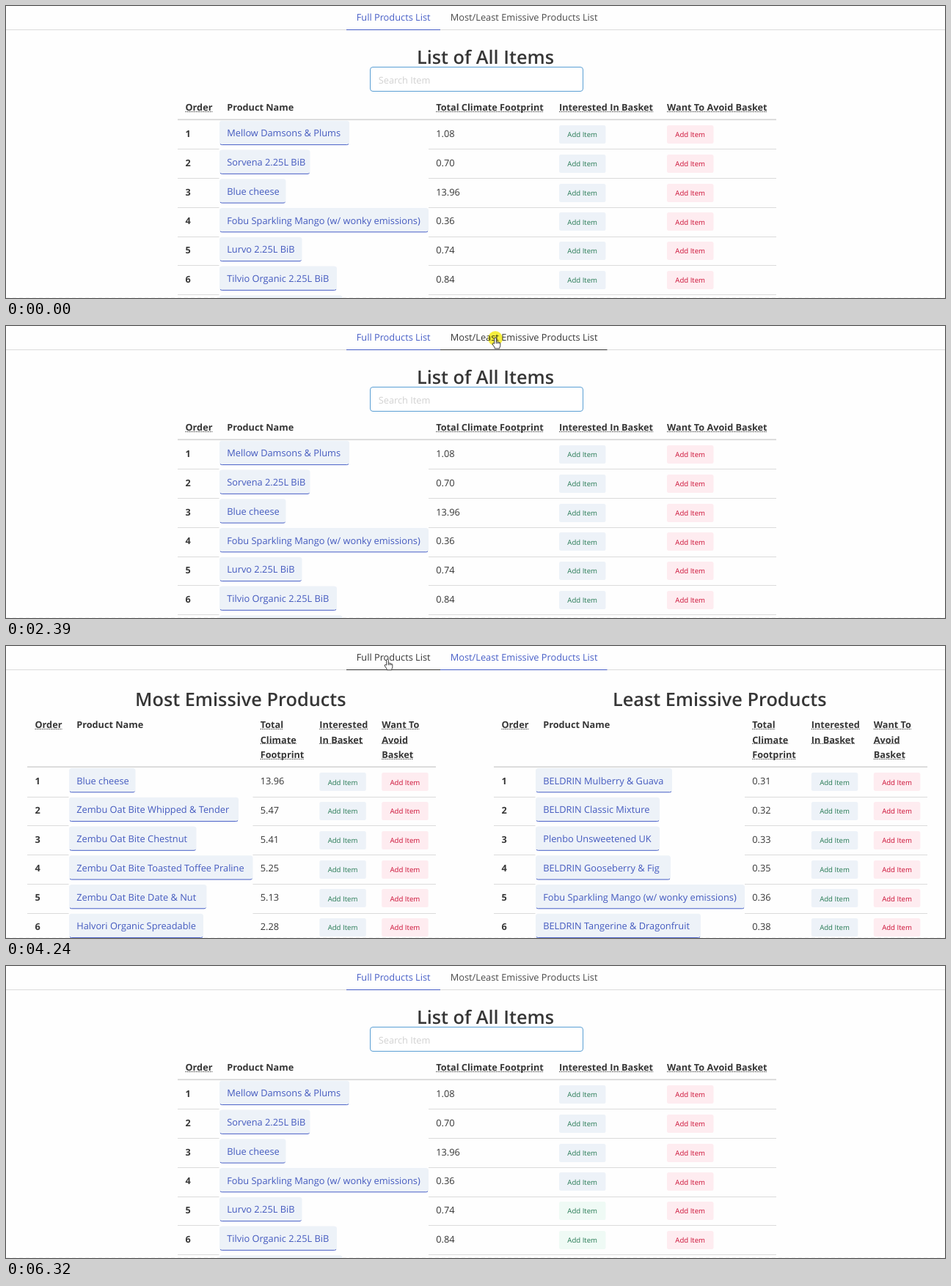
Recreate the animation shown at these times as an HTML page. Size 1280 by 399 pixels, loop 7320 ms.

```html
<!DOCTYPE html>
<html lang="en">
<head>
<meta charset="utf-8">
<title>Product lists</title>
<style>
  html, body { margin: 0; width: 100%; height: 100%; overflow: hidden; background: #fefefe; }
  svg { display: block; width: 100vw; height: 100vh; }
  text { font: 400 12.8px "Open Sans", "Noto Sans", sans-serif; fill: #363636; text-rendering: geometricPrecision; white-space: pre; }
  .bold { font-size: 12.7px; font-weight: 700; }
  .title { font-size: 25.3px; font-weight: 600; text-anchor: middle; }
  .small { font-size: 9.6px; text-anchor: middle; }
  .link { fill: #445abf; }
  .hint { fill: #d2d2d2; }
  .add { fill: #257953; }
  .avoid { fill: #cc0f35; }
</style>
</head>
<body>
<svg id="stage" viewBox="0 0 1280 399"></svg>
<script>
const LOOP = 7320;
const PITCH = 39.75;
const BLUE = '#485fc7', DARK = '#363636', RULE = '#dbdbdb';
const TINT = '#edf2f8', PINK = '#feecf0', MINT = '#effaf5';
const stage = document.getElementById('stage');

function make(parent, tag, attrs) {
  const el = document.createElementNS('http://www.w3.org/2000/svg', tag);
  for (const key in attrs) el.setAttribute(key, attrs[key]);
  parent.appendChild(el);
  return el;
}

function label(parent, x, y, str, cls = '') {
  const el = make(parent, 'text', { x, y, class: cls });
  el.textContent = str;
  return el;
}

function box(parent, x, y, width, height, fill, rx = 0) {
  return make(parent, 'rect', { x, y, width, height, fill, rx });
}

function heading(parent, x, y, str, dotted) {
  const el = label(parent, x, y, str, 'bold');
  if (!dotted) return;
  make(parent, 'path', {
    d: `M${x} ${Math.floor(y) + 1.5}h${el.getComputedTextLength()}`,
    stroke: DARK, 'stroke-dasharray': '1.3 1.1'
  });
}

function chip(parent, x, y, right, str) {
  const top = y + 1.7;
  box(parent, x, top, right - x, 33.4, TINT, 3.5);
  make(parent, 'path', {
    d: `M${x + 1} ${top + 31.9}q1 1 2.5 1H${right - 3.5}q1.5 0 2.5-1`,
    fill: 'none', stroke: BLUE
  });
  label(parent, x + 10.2, y + 23.3, str, 'link');
}

function button(parent, x, y, fill, cls) {
  const rect = box(parent, x, Math.round(y + 8.1), 63.5, 25, fill, 2.5);
  label(parent, x + 31.7, y + 24.3, 'Add Item', 'small ' + cls);
  return rect;
}

// cols: order, name, footprint, interested, avoid, right edge
function table(parent, cols, y0, headY, heads, rows) {
  const [x, name, foot, want, avoid, end] = cols;
  const headX = [x + 10.5, name + 10.2, foot + 10.2, want, avoid];
  heads.forEach((head, i) => head.split('|').forEach((str, n) =>
    heading(parent, headX[i], headY + n * 20.4, str, i !== 1)));
  box(parent, x, Math.floor(y0) - 0.6, end - x, 1.7, '#d6d6d6');
  return rows.map(([str, right, value], i) => {
    const y = y0 + PITCH * i;
    const line = Math.round(y + 40.3);
    box(parent, x, line, name - x - 0.5, 1, RULE);
    box(parent, foot, line, end - foot, 1, RULE);
    label(parent, headX[0], y + 24, i + 1, 'bold');
    label(parent, headX[2], y + 24, value);
    chip(parent, name, y, right, str);
    const add = button(parent, want, y, TINT, 'add');
    button(parent, avoid, y, PINK, 'avoid');
    return add;
  });
}

// Tabs
make(stage, 'path', { d: 'M0 398.5H1280', stroke: '#f1f1f1', 'stroke-dasharray': '5 4' });
box(stage, 0, 32, 1280, 1, RULE);
const tabs = [
  { x: 464, width: 128, str: 'Full Products List' },
  { x: 592, width: 227.5, str: 'Most/Least Emissive Products List' }
].map(({ x, width, str }) => ({
  line: box(stage, x, 32, width, 1, BLUE),
  text: label(stage, x + 13.7, 20.3, str)
}));

// Full list
const full = make(stage, 'g', {});
label(full, 653.5, 79, 'List of All Items', 'title');
make(full, 'rect', { x: 496.5, y: 83.5, width: 290, height: 33, rx: 3.5, fill: '#fff', stroke: '#5a9fd4' });
label(full, 507.7, 106.3, 'Search Item', 'hint');
const addButtons = table(full, [234, 291, 576, 754, 901, 1050], 155, 143,
  ['Order', 'Product Name', 'Total Climate Footprint', 'Interested In Basket', 'Want To Avoid Basket'], [
    ['Mellow Damsons & Plums', 468, '1.08'],
    ['Sorvena 2.25L BiB', 414.5, '0.70'],
    ['Blue cheese', 381.5, '13.96'],
    ['Fobu Sparkling Mango (w/ wonky emissions)', 576, '0.36'],
    ['Lurvo 2.25L BiB', 403.5, '0.74'],
    ['Tilvio Organic 2.25L BiB', 451, '0.84'],
    ['', 458.5, '']
  ]);

// Most and least lists
const ranked = make(stage, 'g', {});
const narrowHeads = ['Order', 'Product Name', 'Total|Climate|Footprint', 'Interested|In Basket', 'Want To|Avoid|Basket'];
label(ranked, 319.8, 82.3, 'Most Emissive Products', 'title');
table(ranked, [29, 86, 336.5, 427.3, 512.2, 586], 165.2, 112.3, narrowHeads, [
  ['Blue cheese', 176.5, '13.96'],
  ['Zembu Oat Bite Whipped & Tender', 317, '5.47'],
  ['Zembu Oat Bite Chestnut', 259.5, '5.41'],
  ['Zembu Oat Bite Toasted Toffee Praline', 336.5, '5.25'],
  ['Zembu Oat Bite Date & Nut', 273.5, '5.13'],
  ['Halvori Organic Spreadable', 269, '2.28']
]);
label(ranked, 972.7, 82.3, 'Least Emissive Products', 'title');
table(ranked, [665, 722, 1007, 1097.8, 1182.8, 1256], 165.2, 112.3, narrowHeads, [
  ['BELDRIN Mulberry & Guava', 908, '0.31'],
  ['BELDRIN Classic Mixture', 891, '0.32'],
  ['Plenbo Unsweetened UK', 891, '0.33'],
  ['BELDRIN Gooseberry & Fig', 906, '0.35'],
  ['Fobu Sparkling Mango (w/ wonky emissions)', 1007, '0.36'],
  ['BELDRIN Tangerine & Dragonfruit', 947, '0.38']
]);

// Pointer
const glow = make(stage, 'circle', { r: 10, fill: '#f6ef3f', style: 'mix-blend-mode:multiply' });
const pointer = make(stage, 'g', { fill: '#fff', stroke: '#333', 'stroke-width': 0.95, 'stroke-linejoin': 'round' });
const arrow = make(pointer, 'path', { d: 'M.4 .4V11.4L2.9 9 4.6 12.7 6.2 12 4.6 8.4H8Z' });
const hand = make(pointer, 'path', {
  transform: 'translate(0 -.8)',
  d: 'M-1.3 8V1a1.3 1.3 0 0 1 2.6 0V5.2q1.2-.6 2 .5 1.3-.5 1.9.6 1.6-.3 1.6 1.2V10.5q0 1.5-.9 2.5V14.6H-.9V13.2L-3.8 8.8q-.3-1.4 1-1.5zM1.3 5.2V8M3.3 5.7V8M5.2 6.3V8'
});

// time, x, y
const route = [
  [470, 683, 288], [590, 647, 139], [960, 647, 139],
  [1210, 655, 44], [1420, 660, 26], [1630, 667, 17],
  [3830, 667, 17], [3870, 660, 20], [4050, 600, 28], [4240, 520, 19],
  [5955, 520, 19], [6080, 590, 115], [6320, 800, 402]
];

function pointerAt(t) {
  const i = route.findIndex(p => t < p[0]);
  if (i < 1) return null;
  const [t0, x0, y0] = route[i - 1], [t1, x1, y1] = route[i];
  const k = (t - t0) / (t1 - t0);
  return { x: x0 + (x1 - x0) * k, y: y0 + (y1 - y0) * k };
}

const show = (el, on) => el.setAttribute('display', on ? 'inline' : 'none');
const within = (t, a, b) => t >= a && t < b;

function draw(t) {
  const active = within(t, 2600, 5280) ? 1 : 0;
  show(full, active === 0);
  show(ranked, active === 1);

  const pos = pointerAt(t);
  const hover = pos && pos.y < 32 ? (pos.x < 592 ? 0 : 1) : -1;
  tabs.forEach(({ line, text }, i) => {
    const on = i === active;
    show(line, on || i === hover);
    line.setAttribute('fill', on ? BLUE : DARK);
    text.style.fill = on ? BLUE : i === hover ? DARK : '#4a4a4a';
  });

  show(pointer, !!pos);
  show(glow, within(t, 2390, 2600) || within(t, 5040, 5240));
  if (pos) {
    const move = `translate(${pos.x.toFixed(1)} ${pos.y.toFixed(1)})`;
    pointer.setAttribute('transform', move);
    glow.setAttribute('transform', move);
    show(hand, hover >= 0);
    show(arrow, hover < 0);
  }

  // Buttons brighten once the pointer has crossed them
  addButtons[4].setAttribute('fill', t >= 6250 ? MINT : TINT);
  addButtons[5].setAttribute('fill', t >= 6285 ? MINT : TINT);
}

const start = performance.now();
function tick() {
  draw((performance.now() - start) % LOOP);
  requestAnimationFrame(tick);
}
tick();
</script>
</body>
</html>
```
